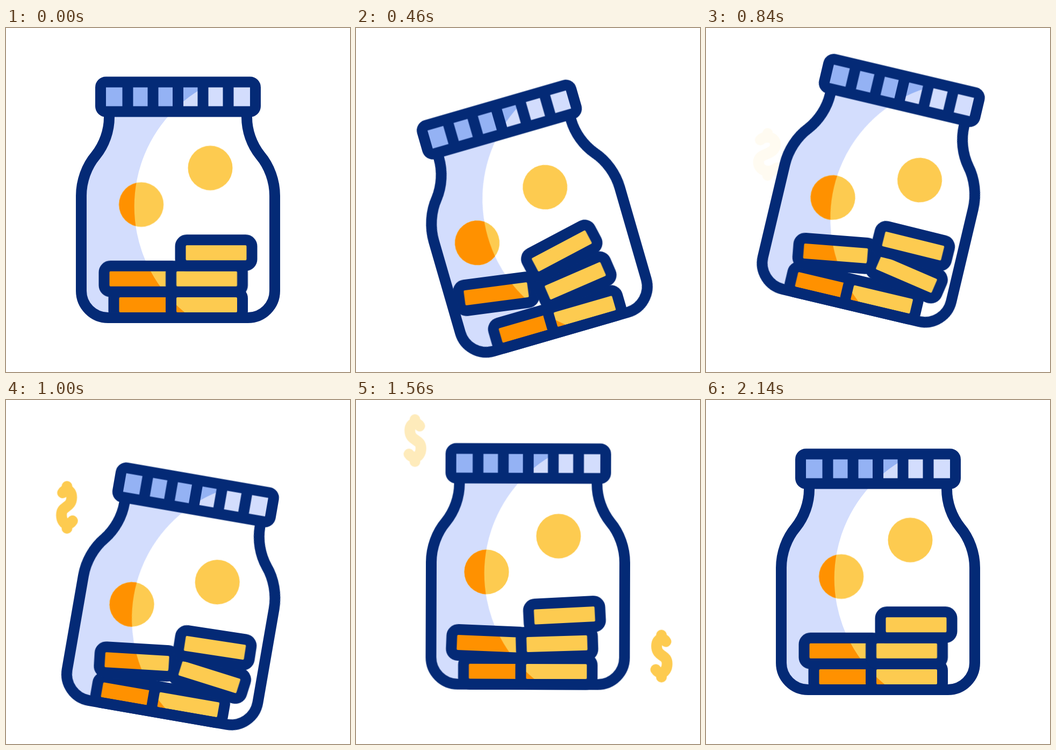
An HTML page that plays this animation: 640x640 px, repeating every 2400 ms.

```html
<!DOCTYPE html>
<html lang="en">
<head>
<meta charset="utf-8">
<title>Coin jar</title>
<style>
  :root {
    --navy: #042a76;
    --yellow: #fdcb50;
    --orange: #ff9100;
    --ice: #d3ddfd;
    --blue: #94b2f4;
    --ease: cubic-bezier(.333, 0, .667, 1);
  }
  html, body { margin: 0; width: 100%; height: 100%; overflow: hidden; background: #fff; }
  svg { display: block; width: 100%; height: 100%; }

  .line { fill: none; stroke: var(--navy); stroke-width: 20; }
  .lit { fill: var(--yellow); }
  .dim { fill: var(--orange); }
  .shade { clip-path: url(#shade); }

  .bob { animation: bob 2400ms var(--ease) infinite; }
  .tilt { transform-origin: 320px 320px; animation: tilt 2400ms var(--ease) infinite; }
  .toss { animation: toss 2400ms var(--ease) infinite; }

  .float { opacity: 0; animation: float 2400ms linear infinite both; }
  .dollar {
    fill: none; stroke: var(--yellow); stroke-width: 20;
    stroke-linecap: round; stroke-linejoin: round;
    animation: spin 2400ms cubic-bezier(.364, 0, .636, 1) infinite both;
  }
  .late, .late .dollar { animation-delay: 320ms; }

  @keyframes bob {
    0%, 89.17%, 100% { transform: translateY(0); }
    14.29% { transform: translateY(54px); }
    30.96% { transform: translateY(-38px); }
    44.17% { transform: translateY(54px); }
    59.58% { transform: translateY(-21.5px); }
    74.17% { transform: translateY(15px); }
  }
  @keyframes tilt {
    0%, 89.17%, 100% { transform: rotate(0deg); }
    16% { transform: rotate(-18.2deg); }
    36.83% { transform: rotate(14deg); }
    54.42% { transform: rotate(-8deg); }
    71.58% { transform: rotate(4.1deg); }
  }
  /* Each loose piece swings left, right, left, then settles. */
  @keyframes toss {
    0%, 70.13%, 100% { transform: translate(0, 0) rotate(0deg); }
    16% { transform: var(--a); }
    37.29% { transform: var(--b); }
    54.42% { transform: var(--c); }
  }
  @keyframes float {
    0%, 34.71% { transform: translateY(237px); opacity: 0; }
    38.88% { opacity: 1; }
    62.5% { opacity: 1; }
    66.67%, 100% { transform: translateY(66.8px); opacity: 0; }
  }
  /* Mirroring the path itself keeps the stroke width constant. */
  @keyframes spin {
    0%, 34.71%, 82.37%, 100% {
      d: path("M-10.5 -27 C-7 -31 -2 -32 3 -32 C11 -32 17.5 -27 17.5 -18.5 C17.5 -8 8 -4 1 -1 C-7 2.5 -14 5 -14 14.5 C-14 24 -6 31 3 31 C10 31 16 29 20 25 M3 -39 L3 -32 M3 31 L3 39");
    }
    58.54% {
      d: path("M10.5 -27 C7 -31 2 -32 -3 -32 C-11 -32 -17.5 -27 -17.5 -18.5 C-17.5 -8 -8 -4 -1 -1 C7 2.5 14 5 14 14.5 C14 24 6 31 -3 31 C-10 31 -16 29 -20 25 M-3 -39 L-3 -32 M-3 31 L-3 39");
    }
  }
</style>
</head>
<body>
<svg viewBox="0 0 640 640">
  <defs>
    <clipPath id="shade">
      <path clip-rule="evenodd" d="M0 0H640V640H0Z M238.7 332a254.3 254.3 0 1 0 508.6 0a254.3 254.3 0 1 0 -508.6 0Z"/>
    </clipPath>
    <path id="body" d="M192 150V166C192 191 183 217 167 237C150 257 140 285 140 312V489A50 50 0 0 0 190 539H450A50 50 0 0 0 500 489V312C500 285 490 257 473 237C457 217 448 191 448 166V150Z"/>
    <rect id="lid" x="176" y="100.5" width="288" height="55" rx="10"/>
  </defs>

  <g transform="translate(111.6 0)"><g class="float"><path class="dollar"/></g></g>
  <g transform="translate(570.1 330)"><g class="float late"><path class="dollar"/></g></g>

  <g class="bob"><g class="tilt">
    <g class="shade"><use href="#body" fill="var(--ice)"/></g>
    <g id="money"></g>
    <use href="#body" class="line"/>
    <use href="#lid" fill="var(--ice)"/>
    <g class="shade"><use href="#lid" fill="var(--blue)"/></g>
    <use href="#lid" class="line"/>
    <path class="line" d="M226.5 101V155M273.5 101V155M320 101V155M366.5 101V155M413.5 101V155"/>
  </g></g>
</svg>

<script>
  // poses: [dx, dy, degrees] for the three swings
  const coins = [
    { x: 251.7, y: 328.5, r: 41.5, poses: [[-36.6, 7.5, 0], [-9.6, 23.5, 0], [-35, 6.2, 0]] },
    { x: 380, y: 260.5, r: 41.5, poses: [[-14.9, 11.4, 0], [11.7, 22.5, 0], [-13.5, 10.6, 0]] },
    { x: 267, y: 515, w: 133 },
    { x: 373.5, y: 515, w: 133 },
    { x: 252, y: 466.7, w: 139, poses: [[-30.7, -29.7, 9.85], [19.5, -14.7, -9.5], [-17.6, -12.5, 9]] },
    { x: 373.5, y: 466.7, w: 133, poses: [[-3.5, -11.4, -8.5], [35, -8, 10.6], [3.2, -14.1, -7.7]] },
    { x: 391, y: 418.2, w: 133, poses: [[-30.3, -23.7, -12.6], [17.8, -13, 1], [-11.5, -30.6, -12.3]] }
  ];

  const motion = poses => poses
    ? `class="toss" style="${poses.map(([x, y, a], i) =>
        `--${"abc"[i]}:translate(${x}px,${y}px) rotate(${a}deg)`).join(";")}"`
    : "";

  const shape = ({ r, w }, cls) => r
    ? `<circle r="${r}" class="${cls}"/>`
    : `<rect x="${-w / 2}" y="-24" width="${w}" height="48" rx="12" class="${cls}"/>`;

  const layer = (coin, cls) =>
    `<g transform="translate(${coin.x} ${coin.y})"><g ${motion(coin.poses)}>${shape(coin, cls)}</g></g>`;

  document.getElementById("money").innerHTML = coins.map(coin =>
    layer(coin, "lit") +
    `<g class="shade">${layer(coin, "dim")}</g>` +
    (coin.w ? layer(coin, "line") : "")
  ).join("");
</script>
</body>
</html>
```
